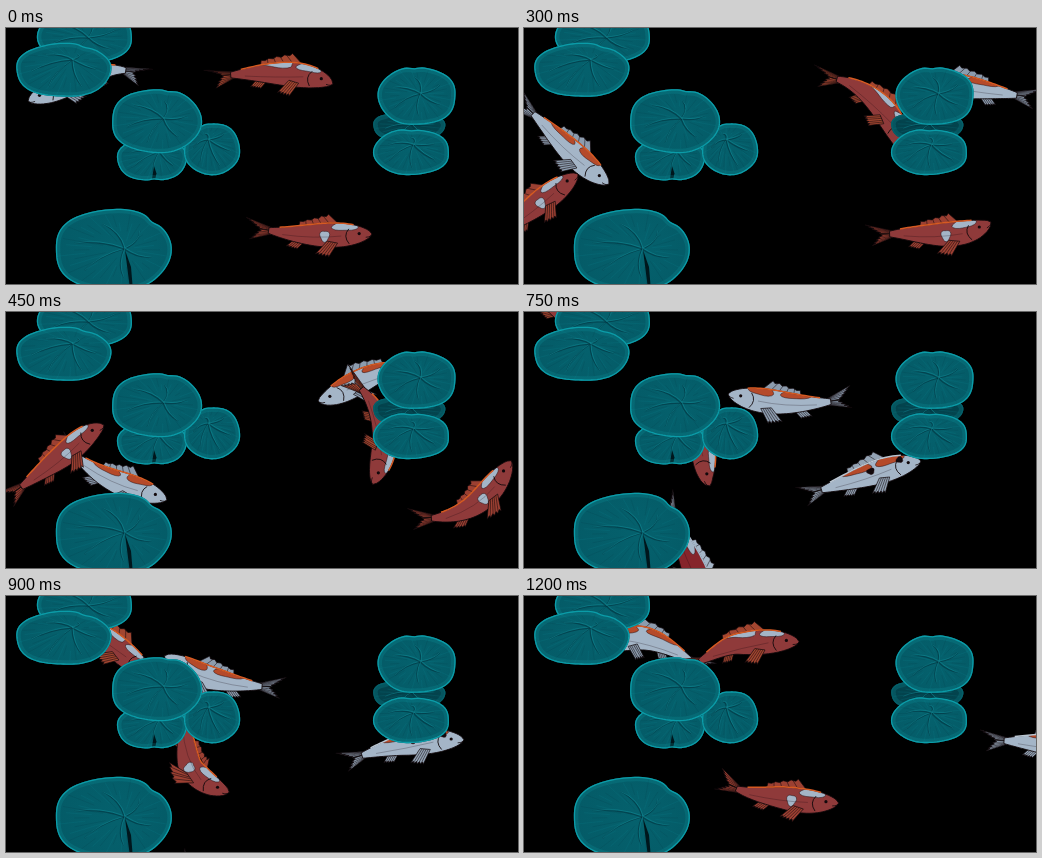
An HTML page with a canvas for the animation above (1.35 s loop, 512 by 256 pixels).

```html
<!DOCTYPE html>
<html lang="en">
<head>
<meta charset="utf-8">
<title>Koi pond</title>
<style>
html, body { margin: 0; width: 100%; height: 100%; overflow: hidden; background: #000; }
canvas { display: block; width: 512px; height: 256px; }
</style>
</head>
<body>
<canvas id="pond" width="512" height="256"></canvas>
<script>
const ctx = document.getElementById("pond").getContext("2d");
const STEP = 150, STEPS = 9, LENGTH = 128;
const RED = "#8f3a3a", ORANGE = "#d65a22", RUST = "#b54a2a", WHITE = "#a4b5c7", INK = "#12090c";

// Patch: place along the fish, offset from the spine, two radii, colour.
const looks = {
  saddle: { body: RED, fin: "#a34630", edge: ORANGE, patches: [
    [.56, 10, .12, 4, WHITE], [.79, 9, .09, 4.5, WHITE]] },
  spotted: { body: RED, fin: "#9c4032", edge: ORANGE, patches: [
    [.79, 9, .1, 5, WHITE], [.63, -1, .037, 5.5, WHITE]] },
  pale: { body: WHITE, fin: "#8c9cae", edge: ORANGE, patches: [
    [.46, 9, .12, 5, RUST], [.74, 10, .1, 5, RUST]] },
  calico: { body: WHITE, fin: "#93a3b4", edge: "#b9c5d1", patches: [
    [.5, 9, .12, 5, RUST], [.76, 9, .11, 5, RUST],
    [.6, 3, .03, 3, INK], [.84, 6, .025, 3, INK]] },
  crimson: { body: "#86252b", fin: WHITE, edge: WHITE, patches: [[.42, 6, .1, 5, WHITE]] }
};

// Key points of the head: [step, x, y]. The body trails along the same route.
const swims = [
  { look: "pale", side: 1, keys: [[1, 3, 80], [2, 85, 156], [3, 161, 188]] },
  { look: "calico", side: 1, keys: [[4, 278, 184], [5, 397, 149], [7, 511, 147], [8, 582, 162]] },
  { look: "pale", side: -1, keys: [[.5, 525, 72], [2, 390, 57], [3, 312, 89], [5, 204, 82],
    [7, 115, 42], [9, 22, 73], [10, -40, 100]] },
  { look: "crimson", side: 1, keys: [[5, 187, 300], [6, 217, 375]] },
  { look: "saddle", side: 1, keys: [[5, 92, 36], [6, 148, 74], [7, 214, 48], [9, 327, 56],
    [11, 378, 124], [13, 345, 225]] },
  { look: "spotted", side: 1, keys: [[2, 54, 146], [3, 98, 113], [4.2, 170, 95], [5, 186, 174],
    [7, 266, 203], [9, 366, 206], [11, 467, 194], [13, 540, 92]] }
];

const pads = [
  { x: 79, y: 8, rx: 47.5, ry: 28, hub: [82, 10], notch: -1.4 },
  { x: 57.5, y: 42, rx: 47.5, ry: 27, hub: [66, 32], notch: -1.1 },
  { x: 146, y: 131, rx: 35, ry: 22, hub: [153, 124], notch: 1.5, slit: [148, 138, 147, 153] },
  { x: 206, y: 121, rx: 28, ry: 26, hub: [202, 112], notch: -2 },
  { x: 150.5, y: 93, rx: 45, ry: 32, hub: [157, 91], notch: -1.3 },
  { x: 403, y: 98, rx: 36, ry: 16, hub: [405, 97], notch: -2.3, dim: true },
  { x: 411, y: 68, rx: 39, ry: 29, hub: [414, 66], notch: -1.65 },
  { x: 405.5, y: 124, rx: 38, ry: 23, hub: [407, 117], notch: -1.6 },
  { x: 107, y: 222, rx: 58, ry: 41, hub: [118, 221], notch: -.8, slit: [119, 222, 125, 256] }
];

const mix = (a, b, t) => [a[0] + (b[0] - a[0]) * t, a[1] + (b[1] - a[1]) * t];

function poly(points) {
  ctx.beginPath();
  points.forEach(p => ctx.lineTo(p[0], p[1]));
  ctx.closePath();
}

function curve(a, c, b, color, width) {
  ctx.beginPath();
  ctx.moveTo(a[0], a[1]);
  ctx.quadraticCurveTo(c[0], c[1], b[0], b[1]);
  ctx.strokeStyle = color;
  ctx.lineWidth = width;
  ctx.stroke();
}

// Smooth route through the keys; straight before the first one.
function route(keys, t) {
  const last = keys.length - 1;
  const slope = (i, d) => {
    const a = keys[Math.max(0, i - 1)], b = keys[Math.min(last, i + 1)];
    return (b[d] - a[d]) / (b[0] - a[0]);
  };
  if (t <= keys[0][0]) return [1, 2].map(d => keys[0][d] + slope(0, d) * (t - keys[0][0]));
  let i = 0;
  while (i < last - 1 && t > keys[i + 1][0]) i++;
  const a = keys[i], b = keys[i + 1], h = b[0] - a[0], u = (t - a[0]) / h, v = 1 - u;
  return [1, 2].map(d => v * v * (1 + 2 * u) * a[d] + u * u * (1 + 2 * v) * b[d]
    + h * u * v * (v * slope(i, d) - u * slope(i + 1, d)));
}

// Maps (along, across) to the stage, following the route back from the head.
function bend(keys, t, side) {
  const PARTS = 40, spine = [route(keys, t)];
  let p = spine[0], walked = 0;
  while (spine.length <= PARTS) {
    t -= .01;
    const q = route(keys, t), d = Math.hypot(q[0] - p[0], q[1] - p[1]);
    while (spine.length <= PARTS && walked + d >= spine.length * LENGTH / PARTS)
      spine.push(mix(p, q, (spine.length * LENGTH / PARTS - walked) / d));
    walked += d;
    p = q;
  }
  spine.reverse();
  return ([s, n]) => {
    const f = Math.max(0, Math.min(1, s)) * PARTS, i = Math.min(PARTS - 1, Math.floor(f));
    const a = spine[Math.max(0, i - 2)], b = spine[Math.min(PARTS, i + 3)];
    const dx = b[0] - a[0], dy = b[1] - a[1], k = side * n / Math.hypot(dx, dy);
    const [x, y] = mix(spine[i], spine[i + 1], f - i);
    return [x + dy * k, y - dx * k];
  };
}

function girth(s) {
  const u = Math.max(0, (s - .18) / .82);
  const bulge = Math.max(0, Math.sin(Math.PI * Math.pow(u, 1.35)));
  return 2.4 * (1 - u) + 13.3 * (.6 + .4 * u) * Math.pow(bulge, .62);
}

function drawFish(look, at) {
  function fin(b0, b1, t0, t1) {
    const edge = [];
    for (let i = 0; i <= 8; i++) edge.push(at(mix(mix(t0, t1, i / 8), mix(b0, b1, i / 8), i % 2 * .14)));
    poly([at(b0), ...edge, at(b1)]);
    ctx.fillStyle = look.fin;
    ctx.fill();
    ctx.strokeStyle = INK;
    ctx.lineWidth = .7;
    ctx.stroke();
    for (let i = 1; i < 5; i++) {
      const a = at(mix(b0, b1, i / 5)), b = at(mix(t0, t1, i / 5));
      curve(a, a, b, INK, .55);
    }
  }

  fin([.27, 0], [.22, 3], [.11, 1], [0, 10]);
  fin([.22, -3], [.27, 0], [.05, -11], [.12, 0]);
  fin([.42, 5], [.75, 10], [.43, 13], [.66, 21]);
  fin([.4, -5], [.47, -8], [.34, -13], [.42, -15]);

  const top = [], bottom = [];
  for (let i = 0; i <= 40; i++) {
    const s = .19 + .81 * i / 40;
    top.push(at([s, girth(s)]));
    bottom.unshift(at([s, -girth(s)]));
  }
  const outline = [...top, ...bottom];
  ctx.save();
  poly(outline);
  ctx.fillStyle = look.body;
  ctx.fill();
  ctx.clip();
  for (const [s, n, rs, rn, color] of look.patches) {
    const ring = [];
    for (let i = 0; i < 24; i++) {
      const a = i * Math.PI / 12, r = 1 + .14 * Math.sin(3 * a + s * 20);
      ring.push(at([s + rs * r * Math.cos(a), n + rn * r * Math.sin(a)]));
    }
    poly(ring);
    ctx.fillStyle = color;
    ctx.fill();
    ctx.strokeStyle = "rgba(35,12,14,.7)";
    ctx.lineWidth = .7;
    ctx.stroke();
  }
  curve(at([.3, -2]), at([.55, -4]), at([.76, -1]), "rgba(20,8,14,.3)", .8);
  ctx.restore();

  poly(outline);
  ctx.strokeStyle = INK;
  ctx.lineWidth = .9;
  ctx.stroke();
  ctx.beginPath();
  top.slice(4, 34).forEach(p => ctx.lineTo(p[0], p[1]));
  ctx.strokeStyle = look.edge;
  ctx.lineWidth = 1.5;
  ctx.stroke();

  fin([.65, -6], [.73, -8], [.56, -19], [.66, -22]);
  curve(at([.82, 6]), at([.77, -1]), at([.82, -9]), INK, .9);
  curve(at([.99, -2]), at([.97, -3]), at([.95, -3]), INK, .8);
  const eye = at([.9, 1]);
  ctx.beginPath();
  ctx.arc(eye[0], eye[1], 1.6, 0, 7);
  ctx.fillStyle = INK;
  ctx.fill();
}

function drawPad({ x, y, rx, ry, hub, notch, slit, dim }) {
  const rim = (a, k = 1) => {
    const c = Math.cos(a), s = Math.sin(a);
    const gap = Math.atan2(Math.sin(a - notch), Math.cos(a - notch)) / .14;
    const square = Math.pow(Math.abs(c) ** 2.2 + Math.abs(s) ** 2.2, -1 / 2.2);
    const r = k * square * (1 + .015 * Math.cos(5 * a + x) - .05 * Math.exp(-gap * gap));
    return [x + rx * r * c, y + ry * r * s];
  };
  const outline = [];
  for (let i = 0; i < 96; i++) outline.push(rim(i * Math.PI / 48));

  ctx.save();
  poly(outline);
  const shade = ctx.createRadialGradient(hub[0], hub[1], 2, x, y, rx);
  shade.addColorStop(0, dim ? "#034650" : "#05616d");
  shade.addColorStop(1, dim ? "#03434d" : "#045b67");
  ctx.fillStyle = shade;
  ctx.fill();
  ctx.clip();

  for (let i = 0; i < 40; i++) {
    const end = rim(i * Math.PI / 20, .8 + .16 * Math.sin(i * 2.4));
    const from = mix(hub, end, .5 + .2 * Math.sin(i * 5.1));
    curve(from, from, end, i % 2 ? "rgba(13,139,148,.16)" : "rgba(0,56,68,.16)", 1);
  }
  for (let i = 0; i < 6; i++) {
    const a = notch + i * Math.PI / 3, end = rim(a, .68), c = mix(hub, rim(a + .35, .8), .5);
    curve(hub, c, end, "rgba(0,50,62,.6)", 1.3);
    curve([hub[0] + 1, hub[1] - 1], [c[0] + 1, c[1] - 1.5], end, "rgba(22,150,160,.5)", .9);
  }
  if (slit) {
    const [ax, ay, bx, by] = slit;
    poly([[ax, ay], [(ax + bx) / 2 + 3, (ay + by) / 2], [bx + 1.5, by + 1], [bx - 1.5, by + 1]]);
    ctx.fillStyle = "#00161c";
    ctx.fill();
  }
  poly(outline);
  ctx.strokeStyle = "rgba(14,150,160,.22)";
  ctx.lineWidth = 9;
  ctx.stroke();
  ctx.strokeStyle = dim ? "#05606a" : "#0b9ca8";
  ctx.lineWidth = 2.6;
  ctx.stroke();
  ctx.restore();
}

function draw(step) {
  ctx.fillStyle = "#000";
  ctx.fillRect(0, 0, 512, 256);
  for (const { look, side, keys } of swims) {
    const end = keys[keys.length - 1][0];
    for (let t = step; t <= end; t += STEPS)
      if (t >= keys[0][0]) drawFish(looks[look], bend(keys, t, side));
  }
  pads.forEach(drawPad);
}

const begin = performance.now();
let shown = -1;
function tick() {
  const step = Math.floor((performance.now() - begin) / STEP) % STEPS;
  if (step !== shown) draw(shown = step);
  requestAnimationFrame(tick);
}
tick();
</script>
</body>
</html>
```
